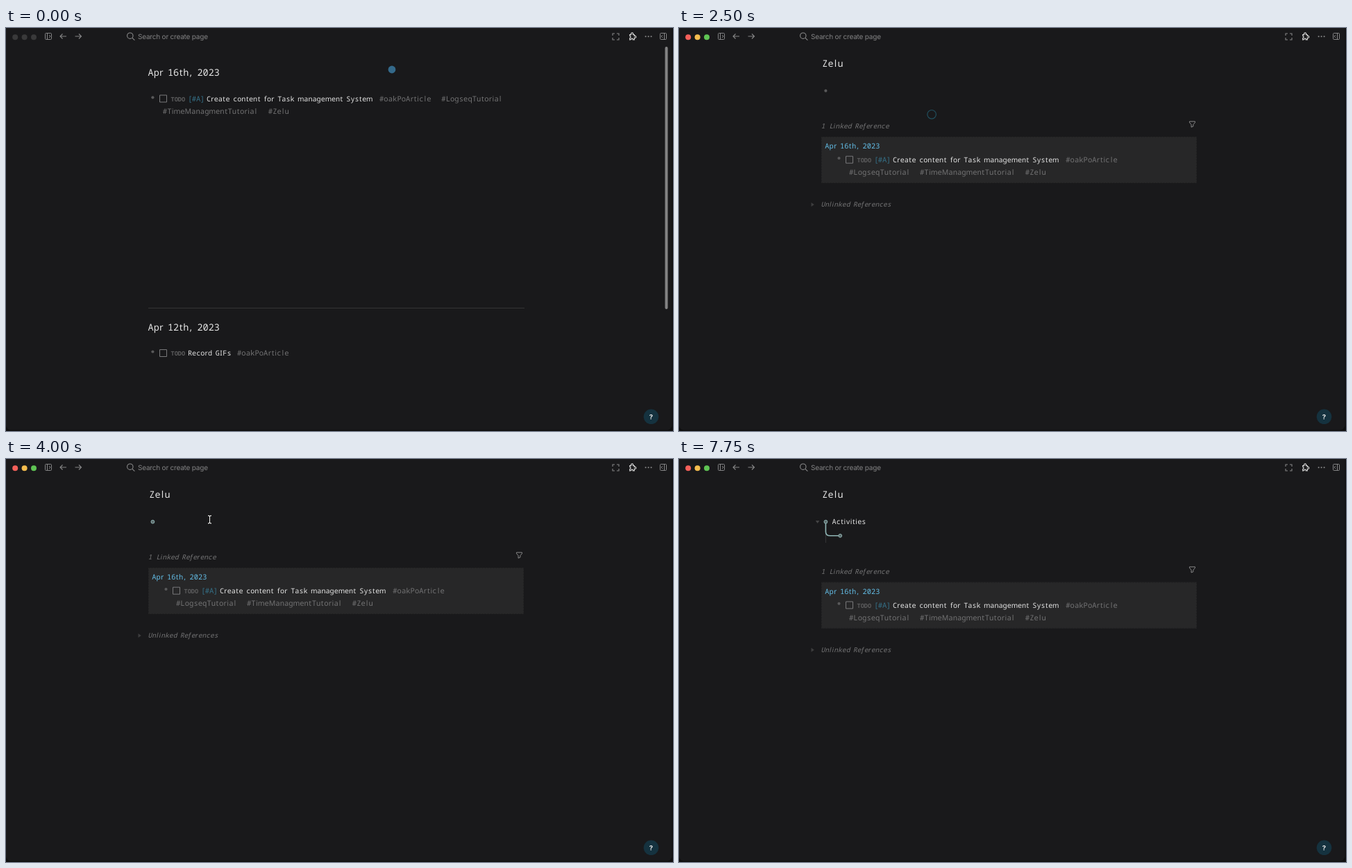
Recreate the animation shown at these times as an HTML page with a canvas. Size 961 px wide and 582 px high, loop 8 s.

```html
<!DOCTYPE html>
<html lang="en">
<head>
<meta charset="utf-8">
<title>Task notes</title>
<style>
html, body { margin: 0; width: 100%; height: 100%; overflow: hidden; background: #0e0e0f; }
canvas { display: block; }
</style>
</head>
<body>
<canvas id="stage" width="961" height="582"></canvas>
<script>
const ctx = document.getElementById('stage').getContext('2d');
ctx.textRendering = 'geometricPrecision';
const LOOP = 8000, TICK = 250;
const BG = '#19191b', DIM = '#747475', TAG = '#727273', WHITE = '#e4e4e4';
const TEAL = '#357087', SKY = '#63bde6', GUIDE = '#8fb5b4';

function line(color, width, ...paths) {
  ctx.strokeStyle = color;
  ctx.lineWidth = width;
  ctx.beginPath();
  for (const p of paths) {
    ctx.moveTo(p[0], p[1]);
    for (let i = 2; i < p.length; i += 2) ctx.lineTo(p[i], p[i + 1]);
  }
  ctx.stroke();
}

function disc(x, y, r, fill, stroke, width = 1) {
  ctx.beginPath();
  ctx.arc(x, y, r, 0, Math.PI * 2);
  if (fill) { ctx.fillStyle = fill; ctx.fill(); }
  if (stroke) { ctx.strokeStyle = stroke; ctx.lineWidth = width; ctx.stroke(); }
}

function rect(x, y, w, h, color, radius = 0) {
  ctx.fillStyle = color;
  ctx.beginPath();
  ctx.roundRect(x, y, w, h, radius);
  ctx.fill();
}

function frame(x, y, w, h, color, width = 1, radius = 0) {
  ctx.strokeStyle = color;
  ctx.lineWidth = width;
  ctx.beginPath();
  ctx.roundRect(x, y, w, h, radius);
  ctx.stroke();
}

function poly(color, ...p) {
  ctx.fillStyle = color;
  ctx.beginPath();
  for (let i = 0; i < p.length; i += 2) ctx.lineTo(p[i], p[i + 1]);
  ctx.fill();
}

// Near-monospaced setting: four cell widths, in units of a normal letter.
function cell(ch) {
  if ('mMwW'.includes(ch)) return 1.5;
  if ('ij'.includes(ch)) return 0.5;
  if ('rtflI ,[]'.includes(ch)) return 0.75;
  return 1;
}

function write(text, x, y, unit, color, style = '500') {
  const size = unit / 0.6;
  ctx.fillStyle = color;
  ctx.textAlign = 'center';
  for (const ch of text) {
    const c = cell(ch);
    const face = c === 1 ? '"Noto Sans Mono", monospace' : '"Noto Sans", sans-serif';
    ctx.font = `${style} ${size}px ${face}`;
    ctx.fillText(ch, x + c * unit / 2, y);
    x += c * unit;
  }
  return x;
}

function label(text, x, y, font, color, spacing = 0) {
  ctx.font = font;
  ctx.fillStyle = color;
  ctx.textAlign = 'left';
  ctx.letterSpacing = spacing + 'px';
  ctx.fillText(text, x, y);
  ctx.letterSpacing = '0px';
}

const body = (s, x, y) => write(s, x, y, 6.1, WHITE);
const tag = (s, x, y) => write(s, x, y, 6.35, TAG);
const heading = (s, x, y) => write(s, x, y, 8.1, WHITE, '');
const bullet = (x, y) => disc(x, y, 2.1, '#59595a');
const liveBullet = (x, y) => disc(x, y, 2.4, '#5d6a6b', GUIDE, 1);
const caret = (x, y) => rect(Math.round(x), y - 6.5, 1, 13, '#d4d4d4');

function todo(x, y) {
  frame(x, y - 5, 10, 10, '#78787a');
  label('TODO', x + 16, y + 3.6, 'bold 8.6px "Noto Sans Mono", monospace', '#5d5d5e');
}

function taskHead(x, y) {
  todo(x, y);
  write('[#A]', x + 41.5, y + 3.7, 6.35, TEAL);
  body('Create content for Task management System', x + 67.5, y + 3.7);
}

function sidebarIcon(x, flip) {
  ctx.save();
  ctx.translate(x, 12);
  ctx.scale(flip, 1);
  frame(-4.5, -4.5, 9, 9, '#858586', 1, 1);
  line('#858586', 1, [-1.5, -4.5, -1.5, 4.5], [1, -2, 3, 0, 1, 2]);
  ctx.restore();
}

function puzzle() {
  ctx.save();
  ctx.translate(902.3, 12.3);
  ctx.beginPath();
  ctx.moveTo(-3.6, -2.6);
  ctx.lineTo(-1.6, -2.6);
  ctx.arc(-0.2, -3.8, 1.6, Math.PI * 0.8, Math.PI * 0.2);
  ctx.lineTo(3, -2.6);
  ctx.lineTo(3, -0.6);
  ctx.arc(4, 0.6, 1.5, -Math.PI * 0.7, Math.PI * 0.7);
  ctx.lineTo(3, 4.6);
  ctx.lineTo(1, 4.6);
  ctx.arc(-0.3, 4.2, 1.4, 0, Math.PI, true);
  ctx.lineTo(-3.6, 4.6);
  ctx.lineTo(-3.6, 2.4);
  ctx.arc(-3.8, 0.8, 1.5, Math.PI * 0.4, -Math.PI * 0.4, true);
  ctx.closePath();
  ctx.strokeStyle = '#d8d8d8';
  ctx.lineWidth = 1.2;
  ctx.stroke();
  ctx.restore();
}

function chrome(active) {
  rect(0, 0, 961, 582, '#0e0e0f');
  rect(0, -10, 959.5, 590.5, BG, 7);
  const lights = active ? ['#f4605a', '#f5bd4e', '#5fc454'] : ['#39393a', '#39393a', '#39393a'];
  lights.forEach((c, i) => disc(13.2 + i * 13.4, 13.3, 4, c));
  sidebarIcon(61, 1);
  sidebarIcon(947, -1);
  line('#858586', 1.1, [87, 12, 78, 12], [81.5, 8.5, 78, 12, 81.5, 15.5],
    [99.5, 12, 108.5, 12], [105, 8.5, 108.5, 12, 105, 15.5]);
  disc(178.8, 11.2, 4.2, null, '#8a8a8b', 1.1);
  line('#8a8a8b', 1.1, [181.9, 14.3, 185.4, 17.6]);
  label('Search or create page', 190, 16, '10px Inter, sans-serif', '#828283', -0.2);
  line('#858586', 1.1, [874, 11, 874, 8, 877, 8], [880, 8, 883, 8, 883, 11],
    [883, 14, 883, 17, 880, 17], [877, 17, 874, 17, 874, 14]);
  puzzle();
  for (const x of [921.6, 925.6, 929.6]) disc(x, 12.3, 1.05, '#8a8a8b');
  disc(929.5, 561.3, 10.8, '#15323f');
  label('?', 926.8, 565, 'bold 9.5px Inter, sans-serif', '#f0f0f0');
}

function journal(hover) {
  rect(949.5, 27, 4, 379, '#838384', 2);
  heading('Apr 16th, 2023', 204.6, 69);
  if (hover) {
    line(GUIDE, 1.6, [211.4, 102, 211.4, 129]);
    liveBullet(211.4, 100.3);
  } else bullet(211.4, 100.3);
  taskHead(221.5, 102);
  tag('#oakPoArticle', 538, 105.7);
  tag('#LogseqTutorial', 627.3, 105.7);
  tag('#TimeManagmentTutorial', 225.8, 124);
  tag('#Zelu', 377.8, 124);
  line('#343435', 1, [205, 404.5, 747, 404.5]);
  heading('Apr 12th, 2023', 204.6, 436.5);
  bullet(211.4, 467.5);
  todo(221.5, 469.5);
  body('Record GIFs', 262, 473.2);
  tag('#oakPoArticle', 333, 473.2);
}

function references(dy) {
  ctx.save();
  ctx.translate(0, dy);
  write('1', 204.5, 145, 5.85, DIM, 'italic');
  write('Linked Reference', 216.5, 145, 5.85, DIM, 'italic');
  ctx.strokeStyle = '#8a8a8b';
  ctx.lineWidth = 1;
  ctx.beginPath();
  for (const [x, y] of [[735.5, 135], [743.5, 135], [743.5, 136.5], [740.9, 139.5],
    [740.9, 142], [738.1, 143.2], [738.1, 139.5], [735.5, 136.5]]) ctx.lineTo(x, y);
  ctx.closePath();
  ctx.stroke();
  rect(205, 157, 541, 67, '#272728');
  ctx.setLineDash([2, 2]);
  frame(205.5, 157.5, 540, 66, '#202021');
  ctx.setLineDash([]);
  write('Apr 16th, 2023', 210.3, 174, 6.2, SKY);
  bullet(230.5, 188);
  taskHead(240.5, 190.2);
  tag('#oakPoArticle', 557.2, 193.9);
  tag('#LogseqTutorial', 245, 212.2);
  tag('#TimeManagmentTutorial', 347, 212.2);
  tag('#Zelu', 498.8, 212.2);
  poly('#3d3d3e', 190.5, 252, 194.8, 255, 190.5, 258);
  write('Unlinked References', 204.5, 258, 5.78, DIM, 'italic');
  ctx.restore();
}

function outline(t) {
  if (t >= 3250 && t < 3500) rect(191.3, 81.3, 555.5, 20.5, '#2a4351');
  if (t < 3500) return bullet(211.4, 90.7);

  const word = 'Activities';
  const typed = t < 4500 ? 0 : Math.min(word.length, ((t - 4500) / TICK + 1) * 2);
  const end = body(word.slice(0, typed), 220.6, 94.4);
  if (t < 6000) {
    liveBullet(211.4, 90.7);
    if (typed) caret(end, 90.5);
  } else if (t < 6250) {
    bullet(211.4, 90.7);
    liveBullet(211.4, 111.4);
    caret(220.9, 111.5);
  } else {
    line('#363637', 1, [211.4, 97, 211.4, 121]);
    ctx.strokeStyle = GUIDE;
    ctx.lineWidth = 1.6;
    ctx.beginPath();
    ctx.moveTo(211.4, 92);
    ctx.lineTo(211.4, 105);
    ctx.quadraticCurveTo(211.4, 110.8, 217.5, 110.8);
    ctx.lineTo(231, 110.8);
    ctx.stroke();
    liveBullet(211.4, 90.7);
    liveBullet(232.2, 110.8);
    if (t < 7000 || (t >= 7250 && t < 7750)) caret(241.6, 111);
    if (t >= 7000) poly('#444445', 196.8, 89, 202.4, 89, 199.6, 93);
  }
}

function ibeam(x, y) {
  const path = [[x, y - 5, x, y + 5],
    [x - 2.5, y - 5.5, x - 1, y - 5.5, x, y - 4.5, x + 1, y - 5.5, x + 2.5, y - 5.5],
    [x - 2.5, y + 5.5, x - 1, y + 5.5, x, y + 4.5, x + 1, y + 5.5, x + 2.5, y + 5.5]];
  line('#000', 2.6, ...path);
  line('#f2f2f2', 1.2, ...path);
}

const stops = [[0, 556, 60], [250, 361, 72], [500, 361, 72], [2000, 388, 136.3],
  [2250, 388, 136.3], [3250, 292.4, 90.4], [3500, 293.5, 87.3], [LOOP, 293.5, 87.3]];

function pointer(t) {
  if (t >= 4500) return;
  const i = stops.findIndex(s => s[0] > t);
  const [t0, x0, y0] = stops[i - 1], [t1, x1, y1] = stops[i];
  const k = (t - t0) / (t1 - t0);
  const x = x0 + (x1 - x0) * k, y = y0 + (y1 - y0) * k;
  if (t >= 3500) ibeam(x, y);
  else if (t >= 2000 && t < 3250) disc(x, y, 6.3, null, '#21505f', 1.2);
  else disc(x, y, 5.4, t < 3250 ? '#34698a' : '#3b80a5');
}

function draw() {
  const t = Math.floor(performance.now() % LOOP / TICK) * TICK;
  chrome(t >= 750);
  if (t < 2500) journal(t >= 1000);
  else {
    heading('Zelu', 206.3, 56.3);
    outline(t);
    references(t >= 6000 ? 20.8 : 0);
  }
  pointer(t);
  requestAnimationFrame(draw);
}
draw();
</script>
</body>
</html>
```
